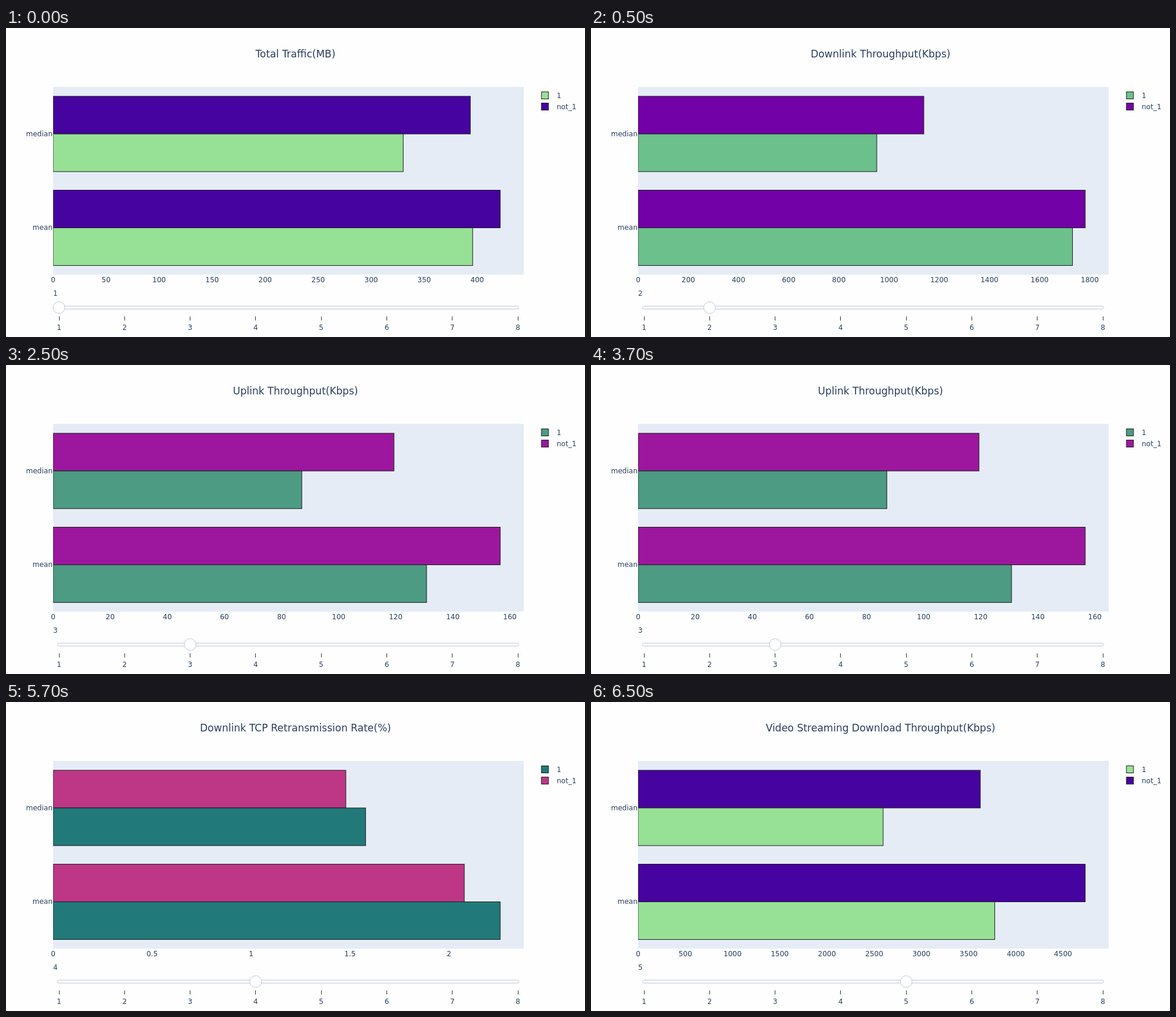
An HTML page with a canvas that plays this animation: 983 px wide and 525 px high, repeating every 8000 ms.

```html
<!DOCTYPE html>
<html lang="en">
<head>
<meta charset="utf-8">
<title>Traffic statistics</title>
<style>
html, body { margin: 0; width: 100%; height: 100%; overflow: hidden; background: #fefefe; }
canvas { display: block; }
</style>
</head>
<body>
<canvas id="chart" width="983" height="525"></canvas>
<script>
const ctx = document.getElementById('chart').getContext('2d');
const FONT = 'Verdana, "DejaVu Sans", sans-serif';
const INK = '#2a3f5f';
const LOOP = 8000;
const PLOT = { x: 80, y: 100, w: 799, h: 319 };
const GREENS = ['#97e196', '#6cc08b', '#4c9b82', '#217a79'];
const PURPLES = ['#46039f', '#7201a8', '#9c179e', '#bd3786'];

// values: not_1 median, 1 median, not_1 mean, 1 mean
const STEPS = [
  { at: 0, title: 'Total Traffic(MB)', tick: 50, values: [393.5, 330.2, 421.7, 395.7] },
  { at: 500, title: 'Downlink Throughput(Kbps)', tick: 200, values: [1138.5, 951, 1781.7, 1731] },
  { at: 2500, title: 'Uplink Throughput(Kbps)', tick: 20, values: [119.4, 87.1, 156.6, 130.8] },
  { at: 4500, title: 'Downlink TCP Retransmission Rate(%)', tick: 0.5, values: [1.479, 1.579, 2.0775, 2.259] },
  { at: 6500, title: 'Video Streaming Download Throughput(Kbps)', tick: 500, values: [3624, 2595, 4735, 3777] }
];
const BAR_TOPS = [116, 180, 275.5, 339.5];
const BAR_HEIGHT = 64;

function text(str, x, y, align = 'left', size = 12) {
  ctx.font = `${size}px ${FONT}`;
  ctx.textAlign = align;
  ctx.fillStyle = INK;
  ctx.fillText(str, x, y);
}

function box(x, y, w, h, fill) {
  ctx.fillStyle = fill;
  ctx.strokeStyle = '#1a1a1a';
  ctx.lineWidth = 1;
  ctx.fillRect(x, y, w, h);
  ctx.strokeRect(x, y, w, h);
}

function drawBars(step, colors) {
  const scale = PLOT.w * 0.95 / Math.max(...step.values);
  ctx.fillStyle = '#e5ecf6';
  ctx.fillRect(PLOT.x, PLOT.y, PLOT.w, PLOT.h);
  ctx.save();
  ctx.beginPath();
  ctx.rect(PLOT.x, PLOT.y, PLOT.w, PLOT.h);
  ctx.clip();
  step.values.forEach((v, i) =>
    box(PLOT.x, BAR_TOPS[i], v * scale, BAR_HEIGHT, colors[i % 2]));
  ctx.restore();

  for (let v = 0; v * scale < PLOT.w; v += step.tick) {
    text(String(v), PLOT.x + v * scale, 432, 'center');
  }
  text('median', 79, 184, 'right');
  text('mean', 79, 343, 'right');
}

function drawLegend(colors) {
  box(909, 108.5, 12, 12, colors[1]);
  box(909, 127.5, 12, 12, colors[0]);
  text('1', 935, 119);
  text('not_1', 935, 138);
}

function drawSlider(index) {
  const tickX = i => 90 + i * 111.29;
  text(String(index + 1), 80, 455);
  ctx.fillStyle = '#fff';
  ctx.strokeStyle = '#bec8d9';
  ctx.lineWidth = 1;
  ctx.beginPath();
  ctx.roundRect(87.5, 472.5, 783, 5, 2);
  ctx.fill();
  ctx.stroke();
  for (let i = 0; i < 8; i++) {
    ctx.fillStyle = '#333';
    ctx.fillRect(Math.round(tickX(i) - 0.5), 490, 1, 7);
    text(String(i + 1), tickX(i), 513, 'center');
  }
  ctx.fillStyle = '#fff';
  ctx.beginPath();
  ctx.arc(tickX(index), 475, 10, 0, Math.PI * 2);
  ctx.fill();
  ctx.stroke();
}

function draw(time) {
  const index = STEPS.findLastIndex(s => s.at <= time);
  const step = STEPS[index];
  const colors = [PURPLES[index % 4], GREENS[index % 4]];
  ctx.fillStyle = '#fefefe';
  ctx.fillRect(0, 0, 983, 525);
  text(step.title, 491.5, 50, 'center', 17);
  drawBars(step, colors);
  drawLegend(colors);
  drawSlider(index);
}

const start = performance.now();
function loop() {
  draw((performance.now() - start) % LOOP);
  requestAnimationFrame(loop);
}
loop();
</script>
</body>
</html>
```
